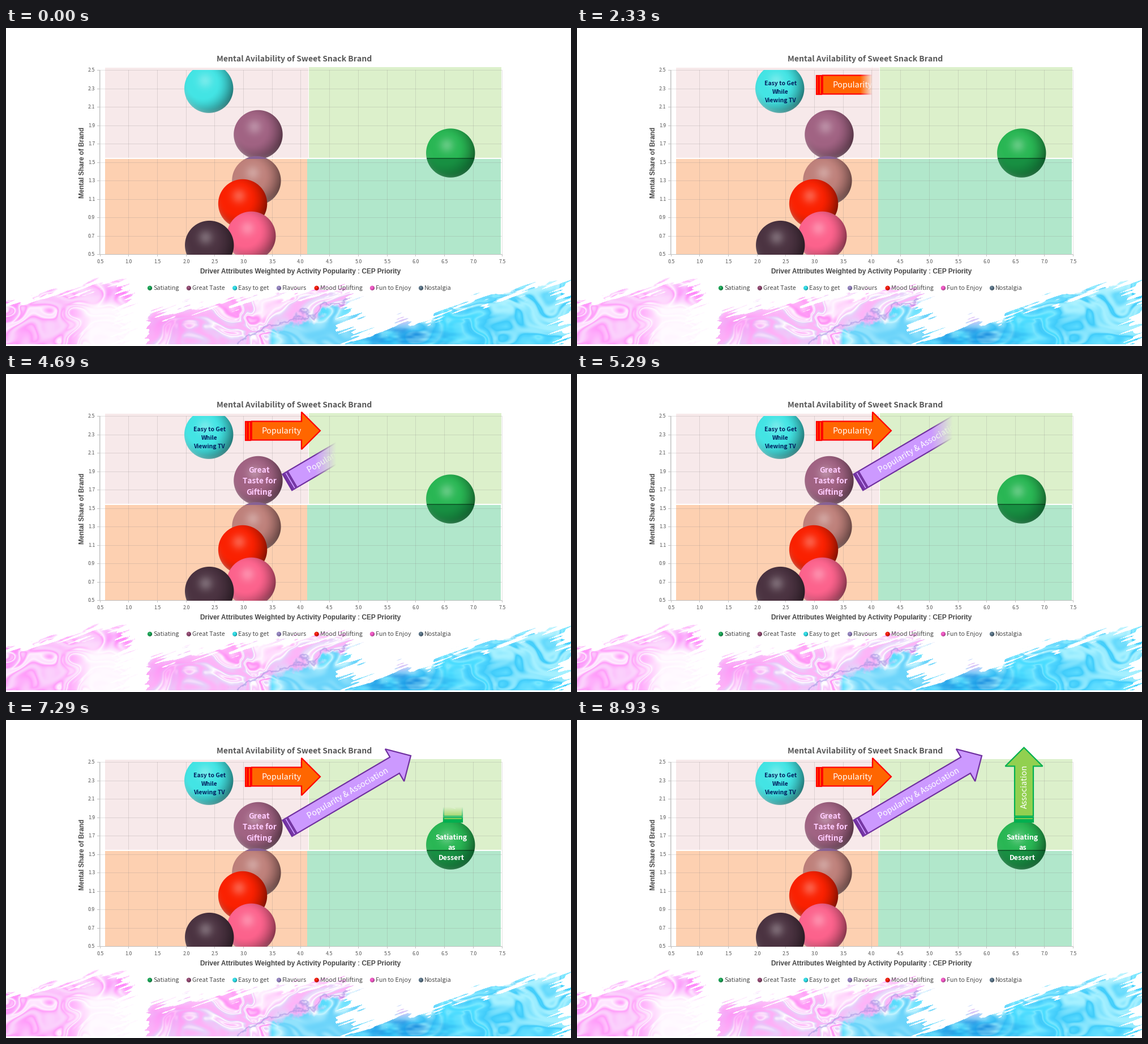
Write a matplotlib script that moves like this. It is 998 by 561 pixels and loops after 8.97 s.

```python
import numpy as np
import matplotlib.pyplot as plt
from matplotlib.animation import FuncAnimation
from matplotlib.colors import LinearSegmentedColormap, to_rgb
from matplotlib.patches import Polygon

W, H, DPI = 998, 561, 64
PT = 72 / DPI                      # points per pixel
LOOP, STEP = 8970, 30
SANS, NARROW = "Noto Sans CJK JP", "Liberation Sans"

fig = plt.figure(figsize=(W / DPI, H / DPI), dpi=DPI, facecolor="white")
ax = fig.add_axes([0, 0, 1, 1])
ax.set(xlim=(0, W), ylim=(H, 0))
ax.axis("off")

Y, X = np.mgrid[0:H, 0:W] + 0.5
canvas = np.ones((H, W, 3))


def mix(a, b, k):
    """Blend colour b over a with weight k."""
    return a + (np.array(to_rgb(b) if isinstance(b, str) else b) - a) * np.asarray(k)[..., None]


# ---- marbled paint along the bottom ----

PAINT_TOP, PAINT_END = 432, 558
PY, PX = np.mgrid[PAINT_TOP:PAINT_END, 0:W].astype(float)


def noise(x, y, seed):
    grid = np.random.default_rng(seed).random((64, 64))
    xi, yi = np.floor(x).astype(int), np.floor(y).astype(int)
    fx, fy = x - xi, y - yi
    fx, fy = fx * fx * (3 - 2 * fx), fy * fy * (3 - 2 * fy)

    def row(j):
        a, b = grid[(yi + j) % 64, xi % 64], grid[(yi + j) % 64, (xi + 1) % 64]
        return a + (b - a) * fx

    return row(0) + (row(1) - row(0)) * fy


def fbm(x, y, seed, octaves=2):
    return sum(noise(x * 2**o, y * 2**o, seed + o) / 2**(o + 1) for o in range(octaves))


def marble(seed, *colors):
    wx, wy = fbm(PX / 80, PY / 50, seed), fbm(PX / 80, PY / 50, seed + 10)
    t = fbm(PX / 150 + 3 * wx, PY / 70 + 3 * wy, seed + 20, 3)
    return LinearSegmentedColormap.from_list("", colors)(0.5 + 0.5 * np.sin(16 * t))[..., :3]


def blob(cx, cy, rx, ry):
    return np.exp(-((PX - cx) / rx)**2 - ((PY - cy) / ry)**2)


streak = noise((PX - 0.36 * PY) / 45, (PY + 0.36 * PX) / 2.8, 1)
rough = fbm(PX / 16, PY / 16, 5, 4) - 0.5


def stroke(band, x0, x1, y0, y1, color, hump=0):
    """Brush stroke rising from y0 to y1, dry along its top and right end."""
    s = np.clip((PX - x0) / (x1 - x0), 0, 1)
    depth = PY - y0 - (y1 - y0) * s**0.8 + 24 * rough + hump
    ragged = 60 * (streak - 0.5)
    cover = (np.clip((depth - 32 * streak) / 3, 0, 1)
             * (PX + 0.2 * ragged > x0) * (PX + ragged < x1))
    color = mix(color, "white", 0.4 * np.clip(1 - depth / 32, 0, 1))
    return mix(band, color, cover)


def paint():
    left = marble(30, "#ff88fa", "#fab8fc", "#fff0ff", "#ff9cfa", "#fbd0fc")
    faded = np.clip((PX - 95) / 55, 0, 1) * np.clip((PY - 470) / 25, 0, 1)
    left = mix(left, "white", 0.9 * faded)

    middle = marble(70, "#ff96f6", "#fff4ff", "#f8c8fb", "#ffffff", "#e6d2fa", "#fdb4f8")
    middle = mix(middle, "#fd86f5", 0.6 * blob(285, 520, 45, 25))
    cyan = marble(110, "#58dcfc", "#86e8ff", "#c4f4ff", "#6cd4fa")
    seam = PY - 545 + 0.4 * (PX - 440) - 40 * rough
    middle = mix(middle, "#9a8ce0", 0.6 * np.exp(-((seam + 3) / 2.5)**2) * (PX > 365))
    middle = mix(middle, cyan, np.clip(seam / 10, 0, 1) * np.clip((PX - 462) / 8, 0, 1))

    right = marble(150, "#4adcff", "#78e8ff", "#52d6fe", "#40ccfa", "#a4f0ff")
    swirl = np.clip(2.2 * fbm(PX / 25, PY / 9, 190) - 0.4, 0, 1)
    right = mix(right, "#0a84dc", swirl * blob(700, 545, 75, 20))
    right = mix(right, "#eebcf6", 0.9 * blob(698, 512, 22, 14))

    band = np.ones(PX.shape + (3,))
    band = stroke(band, -40, 205, 480, 432, left)
    band = stroke(band, 600, 775, 530, 495, right, hump=14 * blob(698, 510, 20, 90))
    band = stroke(band, 752, 980, 490, 432, right)
    return stroke(band, 250, 605, 490, 438, middle)


canvas[PAINT_TOP:PAINT_END] = paint()

# ---- chart ----

LEFT, RIGHT, TOP, BOTTOM = 165, 875, 74, 399
MID_X, MID_Y = 534, 229


def px(v):
    return LEFT + 0.5 + (v - 0.5) * 710 / 7


def py(v):
    return TOP + 0.2 + (2.5 - v) * 162.6


def box(x0, y0, x1, y1, color, k=1.0):
    canvas[y0:y1, x0:x1] = mix(canvas[y0:y1, x0:x1], color, k)


xticks = [(v, round(px(v))) for v in np.arange(0.5, 7.6, 0.5)]
yticks = [(v, round(py(v))) for v in np.arange(0.5, 2.6, 0.2)]

box(175, 70, MID_X, MID_Y, "#f7e9ea")
box(MID_X + 1, 69, RIGHT, MID_Y, "#dcf0cb")
box(175, MID_Y + 2, MID_X - 2, BOTTOM, "#fdd0b1")
box(MID_X - 2, MID_Y + 2, RIGHT - 1, BOTTOM, "#b1e7cb")
for _, x in xticks:
    box(x, TOP, x + 1, BOTTOM, "#827d7d", 0.22)
    box(x, BOTTOM, x + 1, BOTTOM + 4, "#bfbfbf")
for _, y in yticks:
    box(LEFT, y, RIGHT + 1, y + 1, "#827d7d", 0.22)
    box(LEFT - 4, y, LEFT, y + 1, "#bfbfbf")
box(175, MID_Y, RIGHT, MID_Y + 2, "white")
box(MID_X, 69, MID_X + 1, MID_Y, "white")
box(LEFT, TOP, LEFT + 1, BOTTOM + 1, "#bfbfbf")
box(LEFT, BOTTOM, RIGHT + 1, BOTTOM + 1, "#bfbfbf")


def sphere(cx, cy, color, r=43.2, clip=True):
    global canvas
    u, v = (X - cx) / r, (Y - cy) / r
    rho = np.hypot(u, v)
    shade = 0.48 * np.clip((np.hypot(u + 0.25, v + 0.2) - 0.6) / 0.7, 0, 1)**1.5
    shine = 0.26 * np.exp(-((u + 0.15)**2 + (v + 0.32)**2) / 0.09)
    bounce = 0.28 * np.clip(v - 0.3 * u, 0, 1) * np.clip(rho, 0, 1)**8
    c = mix(mix(np.array(to_rgb(color)) * np.ones_like(canvas), "black", shade),
            "white", shine + bounce)
    cover = np.clip((1 - rho) * r + 0.5, 0, 1)
    if clip:
        cover = cover * ((Y > TOP) & (Y < BOTTOM + 0.6))
    canvas = mix(canvas, c, cover)
    return cover


sphere(px(2.4), py(2.3), "#42e4e4")
sphere(px(3.26), py(1.8), "#a06282")
rose = sphere(px(3.23), py(1.3), "#be807a")
canvas = mix(canvas, "#785aa0", 0.75 * rose * (Y < MID_Y + 2))
sphere(px(2.99), py(1.05), "#fa2000")
sphere(px(3.14), py(0.7), "#fc628c")
sphere(px(2.41), py(0.6), "#4a3240")
green = sphere(px(6.61), py(1.6), "#28b653")
canvas = mix(canvas, "#005a2a", 0.42 * green * (Y > MID_Y + 1))
canvas = mix(canvas, "#002810", 0.5 * green * (abs(Y - MID_Y - 1) < 1))


def label(x, y, text, size, color, angle=0, ha="center", font=SANS, weight="normal"):
    """Text whose capitals are centred on (x, y)."""
    a, drop = np.radians(angle), 0.365 * size
    return ax.text(x + drop * np.sin(a), y + drop * np.cos(a), text, fontsize=size * PT,
                   color=color, rotation=angle, rotation_mode="anchor",
                   ha=ha, va="baseline", family=font, weight=weight)


label(509, 53.5, "Mental Avilability of Sweet Snack Brand", 14, "#595959", weight="bold")
for v, x in xticks:
    label(x + 0.5, 411.5, f"{v:.1f}", 8.8, "#595959")
for v, y in yticks:
    label(157, y, f"{v:.1f}", 8.8, "#595959", ha="right")
label(520.5, 428.5, "Driver Attributes Weighted by Activity Popularity : CEP Priority",
      11.9, "#464646", font=NARROW, weight="bold")
label(133.5, 237.5, "Mental Share of Brand", 11.8, "#464646", 90,
      font=NARROW, weight="bold")

LEGEND = {"Satiating": "#14a050", "Great Taste": "#8c446c", "Easy to get": "#28d7e1",
          "Flavours": "#8e7eba", "Mood Uplifting": "#f01400",
          "Fun to Enjoy": "#eb52c0", "Nostalgia": "#567084"}
x = 254
for name, color in LEGEND.items():
    sphere(x, 458.8, color, 4.1, clip=False)
    entry = label(x + 6.3, 458.5, name, 10.8, "#4b4b4b", ha="left")
    x += 6.3 + entry.get_window_extent().width + 17.2


def caption(x, y, words, size, color):
    for i, word in enumerate(words):
        label(x, y + (i - 1) * 1.43 * size, word, size, color, weight="bold")


def arrow(tail, tip, text, fill, edge, h=66):
    """Striped arrow with its text; returns its corner points."""
    tail, tip = np.array(tail, float), np.array(tip, float)
    length = np.hypot(*(tip - tail))
    along = (tip - tail) / length
    across = np.array([-along[1], along[0]])
    q, neck, start = h / 4, length - h / 2, h * 5 / 32
    parts = [[(a, -q), (b, -q), (b, q), (a, q)]
             for a, b in ((0, h / 32), (h / 16, h / 8))]
    parts.append([(start, -q), (neck, -q), (neck, -2 * q), (length, 0),
                  (neck, 2 * q), (neck, q), (start, q)])
    corners = []
    for part in parts:
        pts = [tail + a * along + b * across for a, b in part]
        ax.add_patch(Polygon(pts, closed=True, fc=fill, ec=edge, lw=2.2 * PT,
                             joinstyle="miter", zorder=2.5))
        corners += pts
    x, y = tail + along * (start + length - q) / 2
    label(x, y, text, 14.3, "white", np.degrees(np.arctan2(-along[1], along[0])))
    return np.array(corners)


def snapshot():
    fig.canvas.draw()
    return np.asarray(fig.canvas.buffer_rgba())[..., :3].astype(np.float32)


# ---- settled pictures and the soft wipes between them ----

FIRST, GAP, TICK, TICKS = 1050, 2960, 40, 50

fig.figimage((canvas.clip(0, 1) * 255).round().astype(np.uint8), zorder=-1)
shots, wipes = [snapshot()], []


def scene(corners, upward=False):
    pos, ends = (-Y, -corners[:, 1]) if upward else (X, corners[:, 0])
    wipes.append((pos, ends.min() - 1.5, ends.max() + 1.5))
    shots.append(snapshot())


caption(359.3, 112.5, ("Easy to Get", "While", "Viewing TV"), 10.4, "#002060")
scene(arrow((423.5, 100), (555, 100), "Popularity", "#ff6600", "#ff0000"))

caption(447.5, 188.3, ("Great", "Taste for", "Gifting"), 13.6, "#ffccff")
scene(arrow((496.8, 191), (715, 63), "Popularity & Association", "#cc99ff", "#7030a0"))

caption(787, 224.6, ("Satiating", "as", "Dessert"), 12.4, "white")
scene(arrow((789.5, 180), (789.5, 48.5), "Association", "#92d050", "#00b050"), upward=True)

fig.clear()
screen = fig.figimage(shots[0].astype(np.uint8))


def wipe(pos, start, end, p):
    soft = 0.165 * (end - start)
    lead = start + (end - start + soft) * p
    m = np.clip((lead - pos) / soft, 0, 1)
    m[pos < start] = 1             # captions appear at once
    return m.astype(np.float32)[..., None]


def update(i):
    t = (i + 0.5) * STEP
    img = shots[0]
    for n, shot in enumerate(shots[1:]):
        k = (t - FIRST - n * GAP) // TICK + 1
        if k >= TICKS:
            img = shot
        elif k > 0:
            img = img + (shot - img) * wipe(*wipes[n], k / TICKS)
    screen.set_data(img.astype(np.uint8))
    return [screen]


anim = FuncAnimation(fig, update, frames=LOOP // STEP, interval=STEP,
                     repeat=True, repeat_delay=0, blit=False)
plt.show()
```
